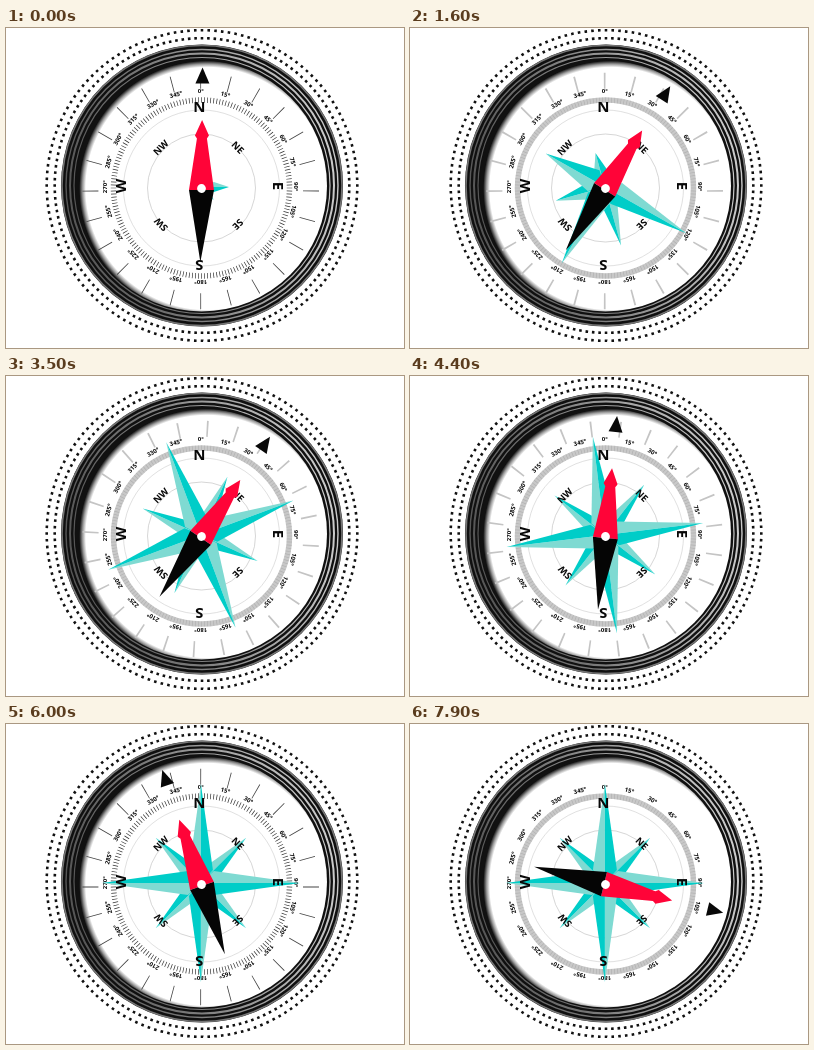
Recreate the animation shown at these times as an HTML page. Size 398 by 320 pixels, loop 8 s.

```html
<!DOCTYPE html>
<html lang="en">
<head>
<meta charset="utf-8">
<title>Compass</title>
<style>
  html, body { margin: 0; width: 100%; height: 100%; overflow: hidden; background: #fff; }
  svg { display: block; width: 100%; height: 100%; }
  text { text-anchor: middle; fill: #080808; font-stretch: 62.5%;
    font-family: "Noto Sans", "Open Sans", "Liberation Sans", sans-serif; }
  .main { font-weight: 800; font-size: 15px; }
  .minor { font-weight: 800; font-size: 9.5px; }
  .deg { font-weight: 600; font-size: 6px; }
</style>
</head>
<body>
<svg id="stage" viewBox="0 0 398 320">
  <defs>
    <radialGradient id="shade" gradientUnits="userSpaceOnUse" cx="5" cy="3" r="131">
      <stop offset=".925" stop-color="#fff"/>
      <stop offset=".95" stop-color="#999"/>
      <stop offset=".975" stop-color="#111"/>
    </radialGradient>
    <linearGradient id="metal" x1="0" y1=".6" x2="1" y2=".4">
      <stop offset="0" stop-color="#555"/>
      <stop offset=".35" stop-color="#777"/>
      <stop offset=".7" stop-color="#aaa"/>
      <stop offset="1" stop-color="#ccc"/>
    </linearGradient>
  </defs>
  <g id="bezel" transform="translate(196 157.5)"></g>
  <g id="dial"></g>
  <g id="rose"></g>
  <g id="letters" transform="translate(193.4 158)"></g>
  <g id="needle">
    <path d="M0-121 7-105H-7Z" fill="#080808"/>
    <path d="M-12.5 1.5H12.5L-.5 73.5Z" fill="#050505"/>
    <path d="M0-68.5 7-53 5-50 12.5 1.5H-12.5L-5-50-7-53Z" fill="#ff0438"/>
    <circle r="4.4" fill="#fff"/>
  </g>
</svg>
<script>
const LOOP = 8000, STEP = 100;
const $ = id => document.getElementById(id);

function add(parent, tag, attrs, content) {
  const el = document.createElementNS("http://www.w3.org/2000/svg", tag);
  for (const name in attrs) el.setAttribute(name, attrs[name]);
  if (content) el.textContent = content;
  parent.append(el);
  return el;
}

function ring(parent, r, stroke, width, extra) {
  return add(parent, "circle", { r, stroke, fill: "none", "stroke-width": width, ...extra });
}

// Evenly spaced radial marks, each centred on its angle.
function marks(parent, r, count, length, width, color) {
  const arc = width / (2 * Math.PI * r) * 360, gap = 360 / count - arc;
  return ring(parent, r, color, length, {
    pathLength: 360, "stroke-dasharray": `${arc} ${gap}`,
    transform: `rotate(${-90 - arc / 2})`
  });
}

function label(parent, text, angle, r, kind, drop) {
  add(parent, "text", { class: kind, y: drop, transform: `rotate(${angle}) translate(0 ${-r})` }, text);
}

// Bezel and its surrounding dots
const bezel = $("bezel");
for (const r of [147.3, 155.3]) marks(bezel, r, 144, 2.6, 2.6, "#111");
add(bezel, "circle", { r: 141, fill: "#101010" });
ring(bezel, 140, "#777", 1.6);
ring(bezel, 136, "url(#metal)", 1.4);
ring(bezel, 132, "url(#metal)", 2);
ring(bezel, 128, "url(#metal)", 1.2);
add(bezel, "circle", { r: 125.5, cx: -.5, cy: .5, fill: "url(#shade)" });

// Dial
const dial = $("dial");
const scale = add(dial, "g", { transform: "translate(195.5 160)" });
ring(scale, 78, "#ccc", .6);
ring(scale, 54, "#bbb", .6);
const blurBand = ring(scale, 88, "#c8c8c8", 5.5);
const fineMarks = marks(scale, 88, 180, 5.5, .7, "#333");
const longMarks = add(dial, "g", {});
const sharpMarks = marks(longMarks, 110.3, 24, 16, .8, "#444");
const softMarks = marks(longMarks, 110.3, 24, 16, 1.7, "#c4c4c4");
const degrees = add(dial, "g", { transform: "translate(194.7 158.7)" });
for (let a = 0; a < 360; a += 15) label(degrees, a + "°", a, 95.5, "deg", 2.2);

["N", "NE", "E", "SE", "S", "SW", "W", "NW"].forEach((name, i) => {
  const main = i % 2 === 0;
  label($("letters"), name, i * 45, main ? 79 : 54.4, main ? "main" : "minor", main ? 5.4 : 3.4);
});

// Rose arms; diagonals lie beneath the cardinal ones.
const rose = $("rose");
const arms = [1, 3, 5, 7, 0, 2, 4, 6].map(i => {
  const main = i % 2 === 0;
  const group = add(rose, "g", { transform: `rotate(${i * 45})` });
  return {
    length: main ? 99 : 64,
    width: main ? 12 : 7.5,
    shoulder: main ? 13 : 20,
    delay: Math.max(0, (i + 6) % 8 - 1) * 285,
    light: add(group, "path", { fill: "#7fdad2" }),
    dark: add(group, "path", { fill: "#00cdc8" })
  };
});

// Tables of [time, value]
const needleTurn = [[0, .5], [2600, 47.5], [5700, -19.7], [5900, -19.7], [7900, 103.5]];
const blur = [[0, 0], [300, 0], [900, 1], [1900, 1], [2400, 0], [2800, 0], [3200, 1],
  [4700, 1], [5500, 0], [6200, 0], [7000, 1]];
const longFade = [[6300, 1], [7200, 0]];
const roseTurn = [[0, 0], [1600, 29.5], [2700, 53.5], [3500, 69.5], [4400, 83], [5000, 88], [5700, 90]];

const linear = u => u;
const sine = u => (1 - Math.cos(Math.PI * u)) / 2;
const clamp = u => Math.min(1, Math.max(0, u));

function at(table, t, ease) {
  const next = table.findIndex(([time]) => time > t);
  if (next === 0) return table[0][1];
  if (next < 0) return table[table.length - 1][1];
  const [t0, v0] = table[next - 1], [t1, v1] = table[next];
  return v0 + (v1 - v0) * ease((t - t0) / (t1 - t0));
}

function drawArm(arm, t) {
  const grown = 1 - (1 - clamp((t - arm.delay + 400) / 2600)) ** 2;
  const tip = arm.length * grown;
  const w = arm.width * Math.min(1, grown * 1.5);
  const s = Math.min(arm.shoulder, tip * .5);
  arm.light.setAttribute("d", `M0 0 ${-w} ${-s} 0 ${-tip}Z`);
  arm.dark.setAttribute("d", `M0 0 ${w} ${-s} 0 ${-tip}Z`);
}

function turn(el, x, y, angle) {
  el.setAttribute("transform", `translate(${x} ${y}) rotate(${angle})`);
}

function render(time) {
  let t = Math.floor(time % LOOP / STEP) * STEP;
  if (t < 200) t = 0;
  const soft = at(blur, t, linear);
  blurBand.setAttribute("opacity", soft);
  fineMarks.setAttribute("opacity", 1 - soft * .85);
  sharpMarks.setAttribute("opacity", 1 - soft);
  softMarks.setAttribute("opacity", soft);
  longMarks.setAttribute("opacity", at(longFade, t, linear));
  turn(longMarks, 194.7, 163, 15 * clamp((t - 2800) / 3000));
  turn(rose, 194.9, 159, at(roseTurn, t, linear));
  arms.forEach(arm => drawArm(arm, t));
  turn($("needle"), 195.5, 160.5, at(needleTurn, t, sine));
}

const start = performance.now();
function tick() {
  render(performance.now() - start);
  requestAnimationFrame(tick);
}
tick();
</script>
</body>
</html>
```
